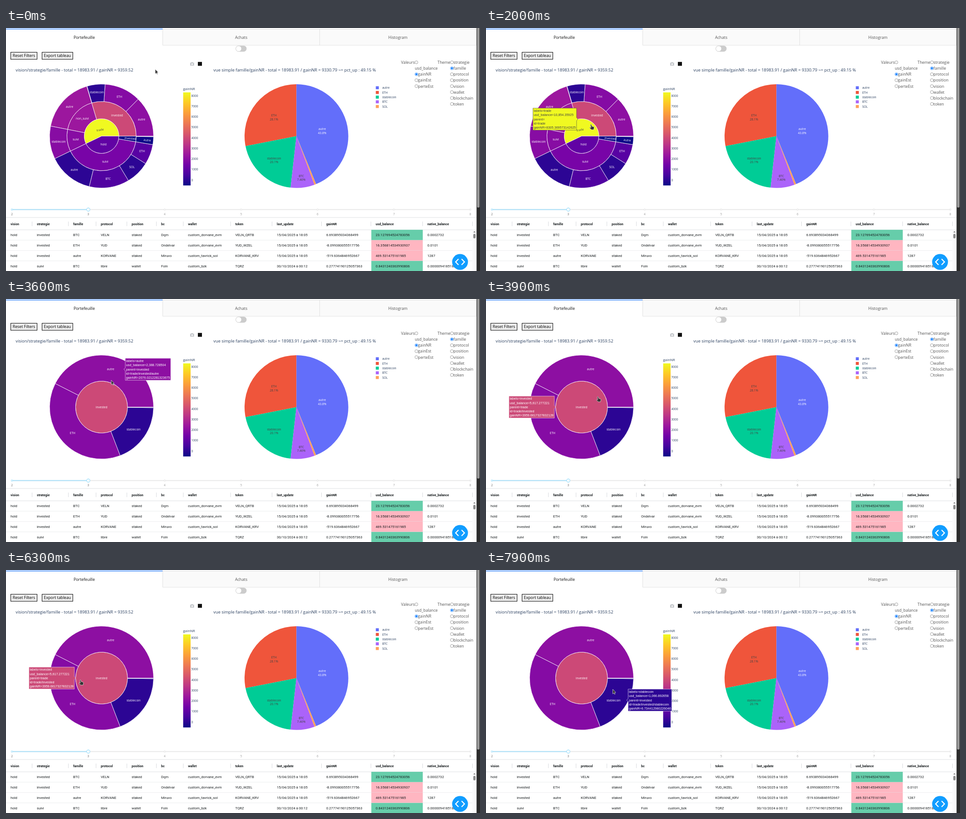
An HTML page that plays this animation: 1045x536 px, repeating every 8000 ms.

```html
<!DOCTYPE html>
<html lang="fr">
<head>
<meta charset="utf-8">
<title>Portefeuille</title>
<style>
  html, body { margin: 0; width: 100%; height: 100%; overflow: hidden; background: #fff; }
  svg { display: block; width: 1045px; height: 536px; font-family: "Open Sans", Verdana, sans-serif; }
  .ui { font-size: 8.75px; fill: #555; }
  .chart { font-size: 6.56px; fill: #2a3f5f; }
  .title { font-size: 9.28px; fill: #2a3f5f; }
  .cell { font: 7.66px Roboto, sans-serif; fill: #181d1f; }
  .head { font: bold 7.1px Roboto, sans-serif; fill: #181d1f; }
  .tip { font: 7.1px "Liberation Sans", Arial, sans-serif; }
  .mid { text-anchor: middle; }
</style>
</head>
<body>
<svg viewBox="0 0 1045 536">
  <defs><linearGradient id="scale" x1="0" y1="1" x2="0" y2="0"></linearGradient></defs>
  <g id="page"></g>
  <g id="sun"></g>
  <g id="tip"></g>
  <g id="cursor" stroke="#e8e8e8" stroke-width=".7" stroke-linejoin="round" fill="#333">
    <path id="arrow" d="M0 0V10.2L2.4 8.2 3.9 11.3 5.3 10.6 3.9 7.5 6.6 7.1Z"/>
    <path id="hand" d="M-1.2 1Q0-.8 1 1L1.8 4.3 5.8 5.2Q7 5.7 6.8 7.6L6 11.8H.8L-2.8 8Q-3.4 6.4-1.9 6.6L-.2 7.4Z"/>
  </g>
</svg>
<script>
const $ = id => document.getElementById(id);
const lerp = (a, b, p) => a + (b - a) * p;
const text = (s, x, y, cls, more = '') => `<text x="${x}" y="${y}" class="${cls}" ${more}>${s}</text>`;
const rect = (x, y, w, h, fill, more = '') =>
  `<rect x="${x}" y="${y}" width="${w}" height="${h}" fill="${fill}" ${more}/>`;
const circle = (x, y, r, fill, more = '') => `<circle cx="${x}" cy="${y}" r="${r}" fill="${fill}" ${more}/>`;
const path = (d, fill, more = '') => `<path d="${d}" fill="${fill}" ${more}/>`;

const PLASMA = ['0d0887', '46039f', '7201a8', '9c179e', 'bd3786', 'd8576b', 'ed7953', 'fb9f3a', 'fdca26', 'f0f921'];
const LOW = -520, HIGH = 8305;

function plasma(v) {
  const s = Math.max(0, Math.min(1, (v - LOW) / (HIGH - LOW))) * 9, i = Math.min(8, Math.floor(s));
  const part = (c, k) => parseInt(c.substr(k, 2), 16);
  return `rgb(${[0, 2, 4].map(k => Math.round(lerp(part(PLASMA[i], k), part(PLASMA[i + 1], k), s - i)))})`;
}

// Ring sector; degrees run counterclockwise from the right.
function sector(cx, cy, r0, r1, a0, a1) {
  if (a1 - a0 > 359.9) return `M${cx - r1} ${cy}a${r1} ${r1} 0 1 0 ${2 * r1} 0a${r1} ${r1} 0 1 0 ${-2 * r1} 0Z`;
  const at = (r, a) => `${cx + r * Math.cos(a * Math.PI / 180)} ${cy - r * Math.sin(a * Math.PI / 180)}`;
  const big = a1 - a0 > 180 ? 1 : 0;
  return `M${at(r0, a0)}L${at(r1, a0)}A${r1} ${r1} 0 ${big} 0 ${at(r1, a1)}L${at(r0, a1)}` +
    (r0 ? `A${r0} ${r0} 0 ${big} 1 ${at(r0, a0)}` : '') + 'Z';
}

// ---------- still parts ----------
function header() {
  let s = rect(0, 2, 1037, 36, '#fafafa') + rect(0, 2, 345.5, 37, '#fff') +
    rect(345.5, 2, 691.5, .7, '#d6d6d6') + rect(0, 1.6, 345.5, 1.3, '#1975fa') +
    rect(345.5, 37.7, 691.5, .7, '#d6d6d6');
  for (const x of [345.3, 691.2, 1036.6]) s += rect(x, 2, .7, 36, '#d6d6d6');
  s += text('Portefeuille', 172.5, 23.5, 'ui mid', 'style="fill:#111"') +
    text('Achats', 518.5, 23.5, 'ui mid') + text('Histogram', 864, 23.5, 'ui mid');
  s += rect(506.3, 38.9, 24.2, 13.4, '#ccc', 'rx="6.7"') +
    circle(512.9, 45.6, 6.2, '#fff', 'stroke="#ccc" stroke-width=".7"');
  for (const [label, x, w] of [['Reset Filters', 10.5, 58], ['Export tableau', 79.5, 67.8]])
    s += rect(x, 53.5, w, 15.5, '#efefef', 'stroke="#111" stroke-width="1.1"') +
      text(label, x + w / 2, 64.3, 'ui mid', 'style="fill:#000"');
  return s;
}

function radios() {
  const radio = (x, y, on) => circle(x, y, 3.3, '#fff', `stroke="${on ? '#0075ff' : '#767676'}" stroke-width=".7"`) +
    (on ? circle(x, y, 2, '#0075ff') : '');
  let s = text('Valeurs', 871, 79.2, 'ui') + text('usd_balance', 901.2, 92.4, 'ui') +
    text('Theme', 951.3, 79.2, 'ui') + radio(904.8, 75.7);
  ['gainNR', 'gainEst', 'perteEst'].forEach((l, i) => {
    const y = 102 + i * 13.1;
    s += radio(904.8, y, i === 0) + text(l, 908.3, y + 3.3, 'ui');
  });
  ['strategie', 'famille', 'protocol', 'position', 'vision', 'wallet', 'blockchain', 'token'].forEach((l, i) => {
    const y = 75.7 + i * 13.13;
    s += radio(983, y, i === 1) + text(l, 986.6, y + 3.4, 'ui');
  });
  return s;
}

function charts() {
  let s = text('vision/strategie/famille - total = 18983.91 / gainNR = 9359.52', 21.3, 96.4, 'title') +
    text('vue simple famille/gainNR - total = 18983.91 / gainNR = 9330.79 ~= pct_up : 49.15 %', 457.3, 96.4, 'title');
  s += path('M406 76.6h2l1-1.4h2.6l1 1.4h2v6.4h-8.6z', '#c4c7cb') + circle(410.3, 79.7, 1.7, '#fff') +
    rect(423, 74.8, 9, 8.6, '#111');
  s += text('gainNR', 390.6, 136.6, 'chart', 'style="font-size:7.8px"') + rect(390.6, 142, 16.4, 205.3, 'url(#scale)');
  for (let i = 0; i <= 8; i++) s += text(i * 1000, 408.6, 337.7 - i * 23.25, 'chart');

  const slices = [['ETH', 28.1, '#EF553B'], ['stablecoin', 20.1, '#00cc96'], ['BTC', 7.46, '#ab63fa'],
    ['SOL', .54, '#FFA15A'], ['autre', 43.8, '#636efa']];
  let a = 90;
  for (const [, share, fill] of slices) s += path(sector(640.3, 238.4, 0, 114.4, a, a += share * 3.6), fill);
  for (const [l, pct, x, y, fill] of [['autre', '43.8%', 697, 225.3, '#fff'], ['ETH', '28.1%', 590.7, 195.4, '#444'],
    ['stablecoin', '20.1%', 591, 289.5, '#444'], ['BTC', '7.46%', 651, 328.6, '#444']])
    s += text(l, x, y, 'chart mid', `style="fill:${fill}"`) + text(pct, x, y + 8.5, 'chart mid', `style="fill:${fill}"`);
  [4, 0, 1, 2, 3].forEach((k, i) => {
    const y = 131.8 + i * 10.35;
    s += rect(815.3, y - 3.3, 6.6, 6.6, slices[k][2]) + text(slices[k][0], 829.4, y + 2.4, 'chart');
  });
  return s;
}

function slider() {
  const step = 168.45, x0 = 13;
  let s = rect(x0, 399.4, 6 * step, 2.2, '#e9e9e9', 'rx="1"') + rect(x0, 399.4, step, 2.2, '#abe2fb', 'rx="1"');
  for (let i = 0; i < 7; i++) {
    s += circle(x0 + i * step, 400.5, 1.7, '#fff', `stroke="${i < 2 ? '#96dbfa' : '#e0e0e0'}"`) +
      text(i + 2, x0 + i * step, 413.2, 'chart mid', `style="fill:${i < 2 ? '#666' : '#999'}"`);
  }
  return s + circle(x0 + step, 400.5, 3.6, '#fff', 'stroke="#96dbfa" stroke-width="1.1"');
}

function table() {
  const cols = [10, 68, 148, 209, 277, 342, 401.3, 505.5, 597, 706, 815, 929];
  const rows = [
    'vision strategie famille protocol position bc wallet token last_update gainNR usd_balance native_balance',
    'hold invested BTC VELN staked Dqm custom_dorvane_evm VELN_QRTB 15/04/2025~à~18:05 6.693895034368499 23.127694524783056 0.0002732',
    'hold invested ETH YUD staked Ondelvar custom_dorvane_evm YUD_WZEL 15/04/2025~à~18:05 -8.099380055517756 16.356814534930937 0.0101',
    'hold invested autre KORVANE staked Miruvo custom_tavrick_sol KORVANE_KRV 15/04/2025~à~18:05 -519.6364846952667 469.531475161985 1287',
    'hold suivi BTC libre wallet Foln custom_bzk TQRZ 30/10/2024~à~00:12 0.27774190125057363 0.8431240363990806 0.0000094185182'
  ];
  let s = rect(0, 417.6, 1037, .8, '#d5d8dc');
  rows.forEach((row, i) => {
    const y = i ? 433.6 + i * 22.9 : 432;
    if (i) s += rect(805.4, y - 11.4, 113.4, 22.9, i % 3 === 1 ? '#66cdaa' : '#ffb6c1');
    row.split(' ').forEach((c, k) => s += text(c.replace(/~/g, ' '), cols[k], y + 2.6, i ? 'cell' : 'head'));
    s += rect(0, i ? y + 11.2 : 444.8, i ? 1028 : 1037, .6, i ? '#dfe1e3' : '#c6cacf');
  });
  for (const x of [...cols.slice(1).map(c => c - 10.8), 1028]) s += rect(x, 427, .8, 10, '#d0d3d7');
  return s + rect(1028.5, 445.4, 8.5, 91, '#fafafa') + path('M1030.4 451h4.6l-2.3-3z', '#777') +
    rect(1030.2, 454, 5, 10, '#8b8b8b', 'rx="2.5"') +
    circle(1001, 516, 17.5, '#119dff') +
    path('M997.6 509.5l-6.3 6.5 6.3 6.5M1004.4 509.5l6.3 6.5-6.3 6.5', 'none', 'stroke="#fff" stroke-width="2.3"') +
    rect(1037.4, 0, 7.6, 536, '#2b2b2b') + rect(1038.6, -5, 5.2, 401, '#9c9c9c', 'rx="2.6"');
}

// ---------- sunburst ----------
const CX = 210.7, CY = 238.4, R = 114.6, FOCUS = 106.52;
// label, start, end, level, gain, role, label radius, label tilt
const NODES = [
  ['trade', 0, 205.8, 0, 8305, 'core', 14, -10],
  ['hold', 205.8, 360, 0, 1054, 'core'],
  ['non_suivi', FOCUS, 168.9, 1, 2420],
  ['suivi', 168.9, 205.8, 1, 1925],
  ['suivi', 205.8, 350.5, 1, 1580],
  ['invested', 350.5, 360, 1, -520, '', 63.5, 5],
  ['autre', FOCUS, 168.9, 2, 2420],
  ['stablecoin', 168.9, 205.8, 2, 1925],
  ['autre', 205.8, 256.3, 2, 10],
  ['BTC', 256.3, 301.1, 2, 700],
  ['SOL', 301.1, 328, 2, 12],
  ['ETH', 328, 350.5, 2, 860],
  ['autre', 350.5, 359.3, 2, -520, '', 101, 5],
  ['', 359.3, 359.7, 2, 0],
  ['', 359.7, 360, 2, 0],
  ['invested', 0, FOCUS, 1, 3960, 'kept'],
  ['autre', 0, 45.3, 2, 2076, 'kept'],
  ['ETH', 45.3, 86.1, 2, 1877, 'kept'],
  ['stablecoin', 86.1, 106.31, 2, 6.7, 'kept', 97.5],
  ['', 106.31, FOCUS, 2, 0, 'kept']
];

function sunburst(p) {
  let shapes = '', labels = '';
  for (const [label, s, e, level, gain, role, lr, tilt] of NODES) {
    let a0 = s, a1 = e, r0 = level * R / 3, r1 = r0 + R / 3;
    if (role === 'core') r1 *= 1 - p;
    else if (role === 'kept') {
      a0 = lerp(s, s / FOCUS * 360, p);
      a1 = lerp(e, e / FOCUS * 360, p);
      r0 = lerp(r0, (level - 1) * R / 2, p);
      r1 = lerp(r1, level * R / 2, p);
    } else { a0 = lerp(s, 360, p); a1 = lerp(e, 360, p); }
    if (r1 < .1 || a1 - a0 < .01) continue;
    shapes += path(sector(CX, CY, r0, r1, a0, a1), plasma(gain), 'stroke="#fff" stroke-width=".8"');
    if (p && role !== 'kept') continue;
    const r = p > .9 && level === 1 ? 0 : !p && lr || (r0 + r1) / 2, m = (a0 + a1) * Math.PI / 360;
    const x = CX + r * Math.cos(m), y = CY - r * Math.sin(m);
    labels += text(label, x, y + 2.2, 'chart mid',
      `style="fill:${gain > 5000 ? '#444' : '#fff'}" transform="rotate(${tilt || 0} ${x} ${y})"`);
  }
  return shapes + labels;
}

// ---------- hover boxes: tip x, y, side, gain, has children, lines ----------
const info = (label, usd, parent, id, gain) =>
  [`labels=${label}`, `usd_balance=${usd}`, `parent=${parent}`, `id=${id}`, `gainNR=${gain}`];
const investedInfo = info('invested', '5,617.277221', 'trade', 'trade/invested', '3959.6617327832128');
const autreInfo = info('autre', '2,388.728504', 'invested', 'trade/invested/autre', '2076.0212281323675');
const ethInfo = info('ETH', '2,150.578059', 'invested', 'trade/invested/ETH', '1876.9060918484428');
const stableInfo = info('stablecoin', '1,066.892658', 'invested', 'trade/invested/stablecoin', '6.734412980226046');
const TIPS = {
  eth: [269, 151, 1, 1877, false, ethInfo],
  invested: [264.5, 192, 1, 3960, true, investedInfo],
  trade: [203, 201, -1, 8305, true, info('trade', '10,854.35925', '', 'trade', '8305.369573142625')],
  hold: [219.5, 275.6, 1, 1054, true, info('hold', '8,129.550492', '', 'hold', '1054.1502816254')],
  root: [154, 238.4, -1, 3960, true, investedInfo],
  bigAutre: [259.7, 155, 1, 2076, false, autreInfo],
  bigEth: [118.5, 296, -1, 1877, false, ethInfo],
  bigStable: [310, 287, 1, 6.7, false, stableInfo]
};
const HOVERS = [[0, ''], [900, 'eth'], [1200, 'invested'], [1500, 'trade'], [1700, 'hold'], [2000, 'trade'],
  [2200, 'invested'], [3100, ''], [3500, 'bigAutre'], [3700, 'root'], [4900, 'bigAutre'], [5800, 'root'],
  [6100, 'bigEth'], [6300, 'root'], [6600, 'bigEth'], [6800, 'root'], [7100, 'bigStable']];

function showTip(name) {
  const g = $('tip');
  g.innerHTML = '';
  if (!name) return;
  const [x, y, side, gain, , lines] = TIPS[name], ink = gain > 5000 ? '#444' : '#fff';
  const write = left => lines.map((l, i) => text(l, left, y - 16 + i * 9.25, 'tip', `fill="${ink}"`)).join('');
  g.innerHTML = write(0);
  const w = Math.max(...[...g.children].map(t => t.getComputedTextLength())) + 3.3, k = 3.3, h = 24.2;
  const box = `M${x} ${y}l${side * k} ${k}v${h - k}h${side * w}v${-2 * h}h${-side * w}v${h - k}Z`;
  g.innerHTML = path(box, plasma(gain), `stroke="${ink}" stroke-width=".6"`) +
    write(side > 0 ? x + k + 1.65 : x - k - w + 1.65);
}

// ---------- pointer: time, x, y ----------
const MOVES = [[0, 329, 91], [300, 325, 93], [500, 325, 93], [800, 300, 120], [900, 268, 145], [1100, 245, 158],
  [1200, 222, 178], [1400, 217, 190], [1500, 220, 210], [1700, 225, 255], [1800, 228, 290], [1900, 231, 240],
  [2000, 231.5, 212.5], [2200, 245, 200], [2300, 255, 192], [2400, 255, 192], [2600, 235, 182], [2800, 235, 182],
  [2900, 227, 175], [3400, 227, 175], [3600, 232, 179], [3700, 246.5, 215], [3900, 246.5, 215], [4200, 233, 229],
  [4300, 233, 229], [4600, 225, 213], [4700, 225, 213], [4800, 223, 186], [4900, 223, 177.5], [5300, 226, 165],
  [5600, 226, 165], [5700, 224, 178], [5800, 215, 195], [6100, 147, 275], [6300, 164, 242], [6500, 170, 255],
  [6600, 165, 276], [6700, 176, 285], [6800, 200, 275], [7100, 255, 285], [7300, 283, 291], [7400, 283, 291],
  [7500, 281.5, 291], [7700, 281.5, 291], [7900, 279.5, 263], [8000, 279.5, 263]];

function pointer(t) {
  const i = MOVES.findIndex(m => m[0] > t), [t0, x0, y0] = MOVES[i - 1], [t1, x1, y1] = MOVES[i];
  const p = (t - t0) / (t1 - t0);
  return [lerp(x0, x1, p), lerp(y0, y1, p)];
}

function zoom(t) {
  if (t > 3200 && t < 3500) t = 3200; // the page stalls briefly here
  const u = Math.max(0, Math.min(1, (t - 3050) / 500));
  return u < .5 ? 4 * u ** 3 : 1 - 4 * (1 - u) ** 3;
}

let lastZoom, lastHover;
function draw(t) {
  const z = zoom(t), hover = HOVERS.filter(h => h[0] <= t).pop()[1];
  if (z !== lastZoom) $('sun').innerHTML = sunburst(lastZoom = z);
  if (hover !== lastHover) showTip(lastHover = hover);
  const [x, y] = pointer(t), hand = !!hover && TIPS[hover][4];
  $('cursor').setAttribute('transform', `translate(${x} ${y})`);
  $('hand').setAttribute('visibility', hand ? 'visible' : 'hidden');
  $('arrow').setAttribute('visibility', hand ? 'hidden' : 'visible');
}

$('scale').innerHTML = PLASMA.map((c, i) => `<stop offset="${i / 9}" stop-color="#${c}"/>`).join('');
$('page').innerHTML = header() + radios() + charts() + slider() + table();

const start = performance.now();
function loop() {
  draw(Math.floor((performance.now() - start) % 8000 / 100) * 100);
  requestAnimationFrame(loop);
}
loop();
</script>
</body>
</html>
```
